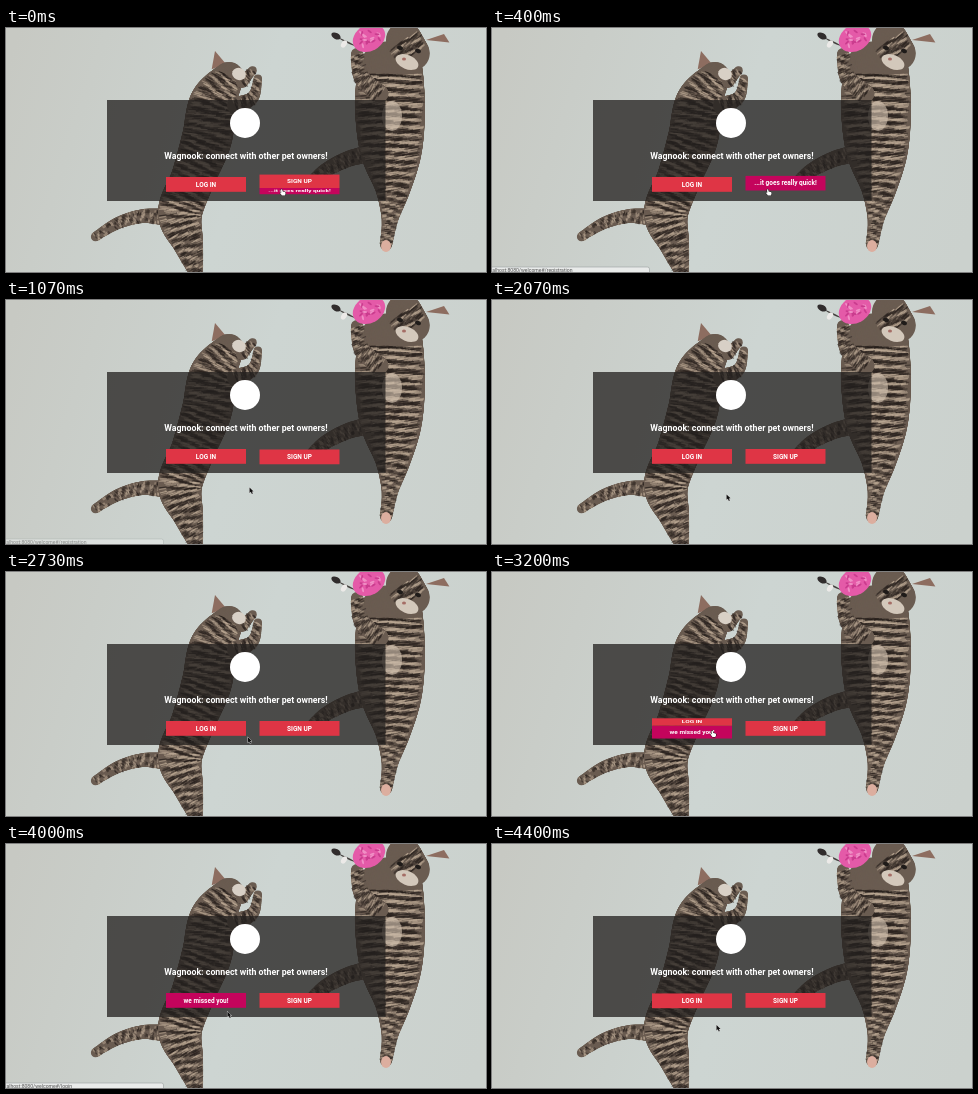
Animation of 480x244 px, one loop 4590 ms. Source, as an HTML page with a canvas:

```html
<!DOCTYPE html>
<html lang="en">
<head>
<meta charset="utf-8">
<title>Wagnook</title>
<style>
  html, body { margin: 0; width: 100%; height: 100%; overflow: hidden; background: #cbd2ce; }
  canvas { display: block; }
</style>
</head>
<body>
<canvas id="stage" width="480" height="244"></canvas>
<script>
const LOOP = 4590, W = 480, H = 244;
const RED = '#df3545', MAGENTA = '#c4045c', FONT = 'Roboto, Arial, sans-serif';
const ctx = document.getElementById('stage').getContext('2d');

const clamp = v => Math.min(1, Math.max(0, v));
const smooth = v => (v = clamp(v)) * v * (3 - 2 * v);

function write(g, text, x, y, font, align = 'center') {
  g.font = font + ' ' + FONT;
  g.textAlign = align;
  g.textBaseline = 'middle';
  g.fillText(text, x, y);
}

function paintPhoto() {
  const canvas = document.createElement('canvas');
  canvas.width = W;
  canvas.height = H;
  const g = canvas.getContext('2d');
  let seed = 7;
  const rand = () => (seed = seed * 16807 % 2147483647) / 2147483647;

  const blob = (x, y, rx, ry, color, turn = 0) => {
    g.fillStyle = color;
    g.beginPath();
    g.ellipse(x, y, rx, ry, turn, 0, 7);
    g.fill();
  };
  const ear = (x, y, dx, dy) => {
    g.fillStyle = '#8d6d60';
    g.beginPath();
    g.moveTo(x, y);
    g.lineTo(x + dx, y + dy);
    g.lineTo(x - dx * .3, y + dy * 1.4);
    g.fill();
  };
  const spline = (a, b, c, d, f) =>
    b + f / 2 * (c - a + f * (2 * a - 5 * b + 4 * c - d + f * (3 * (b - c) + d - a)));

  // Discs along a curve through [x, y, radius] points, then banded fur across it
  const limb = (...points) => {
    const last = points.length - 1, discs = [];
    for (let i = 0; i < last; i++) {
      const [a, b, c, d] = [i - 1, i, i + 1, i + 2].map(k => points[Math.min(last, Math.max(0, k))]);
      const steps = Math.ceil(Math.hypot(c[0] - b[0], c[1] - b[1]));
      for (let s = 0; s < steps; s++) discs.push(b.map((v, k) => spline(a[k], v, c[k], d[k], s / steps)));
    }
    discs.forEach(([x, y, r]) => blob(x, y, r, r, '#6a5c51'));
    g.lineWidth = 1.2;
    discs.forEach(([x, y, r], i) => {
      const [px, py] = discs[Math.max(0, i - 1)], [nx, ny] = discs[Math.min(discs.length - 1, i + 1)];
      const len = Math.hypot(nx - px, ny - py), ux = (py - ny) / len, uy = (nx - px) / len;
      for (let n = 0; n < r / 3; n++) {
        const u = rand() * 1.7 - .85, half = r * .12 + 1;
        const dark = Math.sin(i * .8 + u * 2) + rand() > .35;
        g.strokeStyle = dark ? '#29221e88' : '#bba99588';
        g.beginPath();
        g.moveTo(x + ux * (u * r - half), y + uy * (u * r - half));
        g.lineTo(x + ux * (u * r + half), y + uy * (u * r + half) + 1);
        g.stroke();
      }
    });
  };

  const light = g.createLinearGradient(0, 40, W, 200);
  ['#c7c9c3', '#cdd5d2', '#cbd1cd'].forEach((c, i) => light.addColorStop(i / 2, c));
  g.fillStyle = light;
  g.fillRect(0, 0, W, H);
  g.filter = 'blur(0.4px)';

  // Left cat
  limb([165, 190, 9], [138, 188, 7], [112, 195, 6], [89, 209, 4.5]);
  ear(209, 23, 11, 13);
  limb([223, 49, 15], [207, 74, 23], [201, 110, 25], [187, 150, 22], [174, 185, 22], [182, 215, 15], [191, 248, 6]);
  limb([230, 78, 9], [247, 69, 6], [252, 50, 4]);
  limb([236, 54, 6], [247, 42, 4]);
  blob(233, 46, 7, 6, '#d8d0c6', .4);

  // Right cat
  limb([372, 125, 9], [345, 130, 8], [320, 142, 7], [302, 157, 5]);
  limb([384, 46, 33], [384, 80, 35], [385, 120, 31], [387, 158, 18], [384, 190, 8.5], [380, 217, 6]);
  ear(438, 6, -18, 6);
  ear(386, -4, 14, 8);
  limb([398, 12, 18], [407, 26, 17]);
  limb([351, 26, 6], [356, 50, 8], [374, 66, 9]);
  blob(386, 88, 10, 15, '#cfc0ada0');
  blob(401, 34, 12, 7, '#d3c8bb', .4);
  blob(394, 20, 3, 2, '#1f1b19', .3);
  blob(412, 23, 3, 2, '#1f1b19', .3);
  blob(398, 31, 2, 1.5, '#a56d65');
  blob(380, 218, 5, 6, '#dcae9f');

  // Toy
  blob(341, 14, 9, .7, '#45413f', .45);
  blob(330, 8, 5, 3, '#302c2c', .5);
  blob(338, 16, 2.5, 4, '#eceae8', .6);
  blob(363, 10, 17, 13, '#e45aa8', -.5);
  for (let i = 0; i < 20; i++) {
    blob(351 + rand() * 24, 2 + rand() * 17, 2.5, 1, i % 2 ? '#f08fc5' : '#ca3c8e', rand() * 3);
  }
  g.filter = 'none';

  // Panel, badge and headline
  g.fillStyle = 'rgba(32,30,28,.75)';
  g.fillRect(101, 72, 278.5, 101);
  blob(239, 95, 15, 15, '#fff');
  write(g, 'Wagnook: connect with other pet owners!', 240, 128.5, 'bold 8.8px');
  return canvas;
}

const photo = paintPhoto();

function face(x, y, squash, color, label) {
  if (squash < .02) return;
  ctx.save();
  ctx.translate(x, y);
  ctx.scale(1, squash);
  ctx.fillStyle = color;
  ctx.fillRect(-40, -7.4, 80, 14.8);
  ctx.fillStyle = '#fff';
  write(ctx, label, 0, .2, 'bold 6.5px');
  ctx.restore();
}

// A box turning about its horizontal axis
function cube(x, degrees, front, under) {
  const a = degrees * Math.PI / 180, c = Math.cos(a), s = Math.sin(a), y = 156.4;
  face(x, y + 7.4 * c, s, MAGENTA, under);
  face(x, y - 7.4 * s, c, RED, front);
}

// Damped spring from 0 to 1, with a slight overshoot
const spring = t => t < 0 ? 0 : 1 - Math.exp(-.009 * t) * (Math.cos(.01 * t) + .9 * Math.sin(.01 * t));
const swing = (t, enter, leave, angle) => angle * (spring(t - enter) - spring(t - leave));
const fade = (t, enter, leave) => clamp((t - enter) / 200) * clamp(1 - (t - leave) / 250);

function status(label, end, alpha) {
  if (!alpha) return;
  ctx.save();
  ctx.globalAlpha = alpha;
  ctx.beginPath();
  ctx.roundRect(-4, 239, 161.5, 9, 2);
  ctx.fillStyle = '#e9ebea';
  ctx.fill();
  ctx.strokeStyle = '#a2a8a7';
  ctx.lineWidth = .7;
  ctx.stroke();
  ctx.fillStyle = '#555';
  write(ctx, 'localhost:8080/welcome#/' + label, end, 242.6, '5.1px', 'right');
  ctx.restore();
}

const ARROW = new Path2D('M0 0V5.4L1.3 4.3 2.3 6.5 3.3 6 2.3 4 4 3.9Z');
const HAND = new Path2D('M0 0Q1-.8 1.4.4L1.6 2 4 2.5Q4.8 3 4.5 4.4L3.8 6H1L-1 3.6Q-.8 2.7.3 3.2Z');

// Each move: start, end, x, y
const MOVES = [[0, 1, 275, 161.5], [670, 1100, 243, 188], [2000, 2070, 234.5, 194.5],
  [2100, 2530, 245, 166], [2600, 3200, 219.5, 159], [3800, 4270, 224.5, 181]];

function pointer(t, hand) {
  let [, , x, y] = MOVES[0];
  for (const [start, end, toX, toY] of MOVES) {
    const f = smooth((t - start) / (end - start));
    x += (toX - x) * f;
    y += (toY - y) * f;
  }
  const shape = hand ? HAND : ARROW;
  ctx.save();
  ctx.translate(x, y);
  ctx.lineWidth = .9;
  ctx.strokeStyle = hand ? '#111' : '#ddd';
  ctx.stroke(shape);
  ctx.fillStyle = hand ? '#fff' : '#111';
  ctx.fill(shape);
  ctx.restore();
}

function draw(now) {
  const t = Math.floor((now % LOOP + 3.4) * .015) / .015;
  ctx.drawImage(photo, 0, 0);
  cube(200, swing(t, 3067, 4000, 90), 'LOG IN', 'we missed you!');
  cube(293.5, swing(t, -65, 670, 98), 'SIGN UP', '...it goes really quick!');
  status('registration', 80.5, fade(t, 70, 970));
  status('login', 66, fade(t, 3270, 4130));
  pointer(t, t < 730 || t > 3060 && t < 3900);
  requestAnimationFrame(draw);
}
requestAnimationFrame(draw);
</script>
</body>
</html>
```
